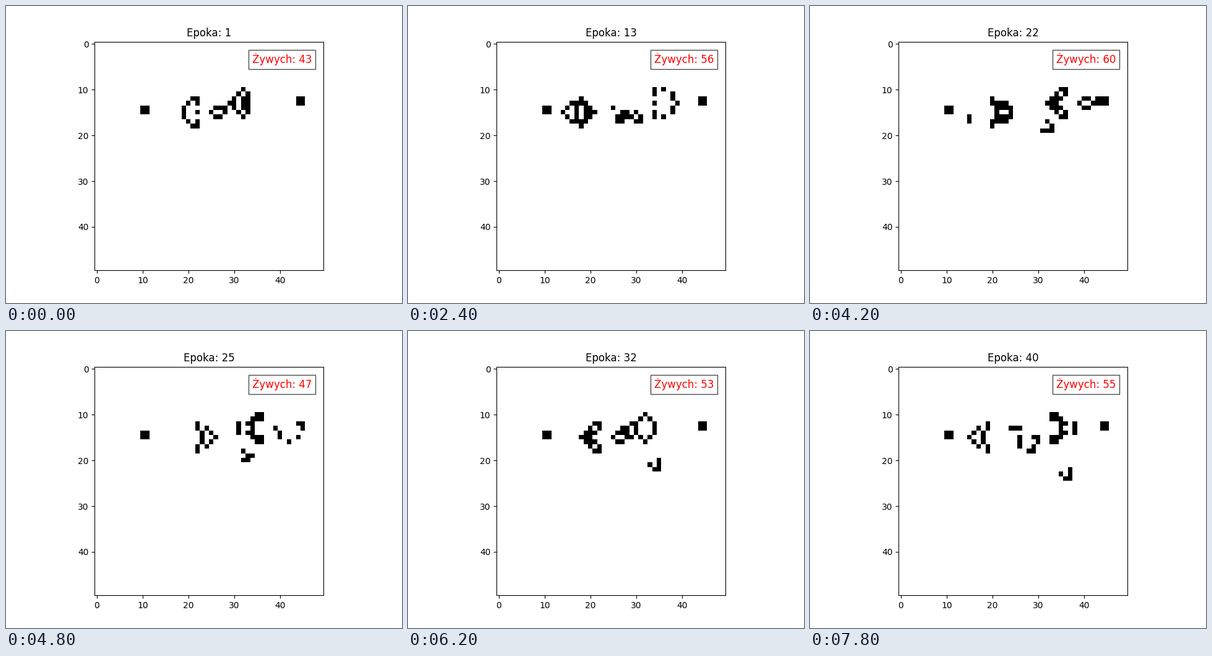
A matplotlib script that plays this animation: 640 by 480 pixels, repeating every 8000 ms.

```python
import numpy as np
import matplotlib.pyplot as plt
from matplotlib.animation import FuncAnimation

SIZE = 50
EPOCHS = 40
INTERVAL = 200

# Glider gun, top-left corner at row 10, column 10
GUN = """
......................#.............
.....................#.#............
...........##.......#.##..........##
..........#.#......##.##..........##
##.......#......###.#.##............
##.......#..#..#..#..#.#............
.........#......##....#.............
..........#.#.......................
...........##.......................
""".split()


def start_grid():
    grid = np.zeros((SIZE, SIZE), dtype=int)
    for r, line in enumerate(GUN):
        for c, mark in enumerate(line):
            grid[10 + r, 10 + c] = mark == "#"
    return grid


def step(grid):
    shifts = [(dr, dc) for dr in (-1, 0, 1) for dc in (-1, 0, 1) if dr or dc]
    near = sum(np.roll(grid, s, axis=(0, 1)) for s in shifts)
    return ((near == 3) | ((grid == 1) & (near == 2))).astype(int)


history = [start_grid()]
while len(history) < EPOCHS:
    history.append(step(history[-1]))

fig, ax = plt.subplots(figsize=(6.4, 4.8), dpi=100)
image = ax.imshow(history[0], cmap="binary", vmin=0, vmax=1,
                  interpolation="nearest")
title = ax.set_title("")
label = ax.text(0.95, 0.95, "", transform=ax.transAxes, color="red",
                fontsize=12, ha="right", va="top",
                bbox=dict(facecolor="white", alpha=0.7))


def update(i):
    grid = history[i]
    image.set_data(grid)
    title.set_text(f"Epoka: {i + 1}")
    label.set_text(f"Żywych: {grid.sum()}")
    return image, title, label


anim = FuncAnimation(fig, update, frames=EPOCHS, interval=INTERVAL,
                     repeat=True, repeat_delay=0, blit=False)
plt.show()
```
